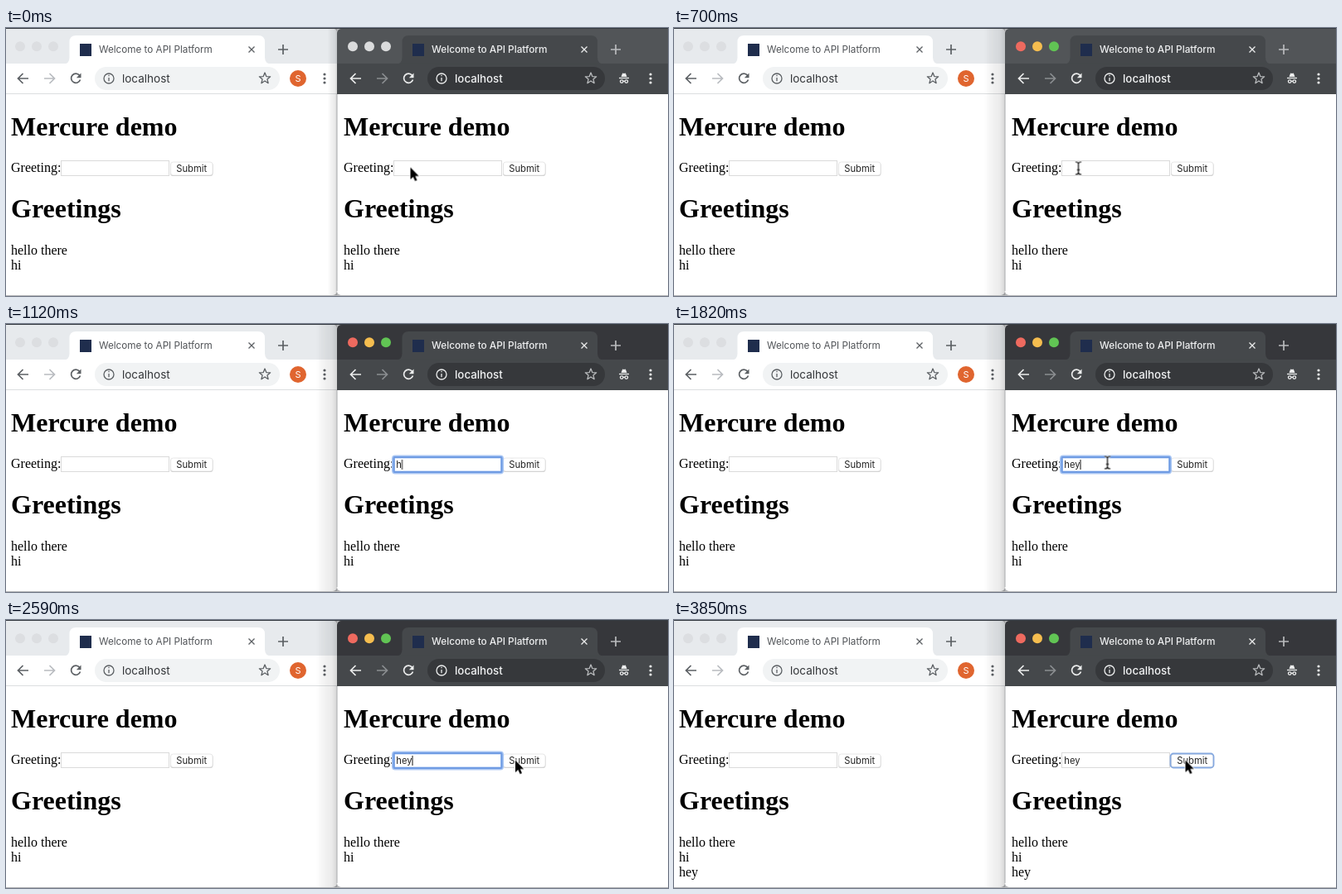
An HTML page that plays this animation: 798 by 324 pixels, repeating every 3.92 s.

```html
<!DOCTYPE html>
<html lang="en">
<head>
<meta charset="utf-8">
<title>Mercure demo</title>
<style>
html, body { margin: 0; width: 100%; height: 100%; overflow: hidden; background: #fff; }
svg { display: block; width: 798px; height: 324px; }
text { white-space: pre; }
.ui { font-family: Inter, Roboto, sans-serif; }
.page { font-family: "Liberation Serif", "Times New Roman", serif; font-size: 16px; fill: #000; }
.page .h { font-size: 32px; font-weight: 700; }
.small { font-size: 11.2px; fill: #222; }
.tab { font-size: 11.7px; fill: var(--title); }
.url { font-size: 13.5px; fill: var(--ink); }
.dark .tab { font-size: 11.8px; font-weight: 500; }
.dark .url { font-size: 13.3px; font-weight: 500; }
.line { fill: none; stroke: var(--icon); stroke-width: 1.7; }
.thin { stroke-width: 1.3; }
.dim { stroke: var(--dim); }
.soft { stroke: var(--soft); }
.dot { fill: var(--icon); }
.light { --strip: #e7eaed; --bar: #fff; --box: #f1f3f4; --ink: #333639; --title: #505357; --icon: #5c6064; --soft: #5c6064; --dim: #b9bcc0; --lamp: #dcdee1; }
.dark { --strip: #36373b; --bar: #45484b; --box: #36383b; --ink: #f1f2f3; --title: #eeeff0; --icon: #eceded; --soft: #b9bbbd; --dim: #8b8e91; --lamp: #dadbdc; }

.anim, .anim * { animation-duration: 3920ms; animation-iteration-count: infinite; animation-timing-function: step-end; }
.strip { animation-name: strip; }
.on { animation-name: on; }
.off { animation-name: off; }
.ring { animation-name: ring; }
.c1 { animation-name: c1; }
.c2 { animation-name: c2; }
.c3 { animation-name: c3; }
.caret { animation-name: caret, caretX; }
.beam { animation-name: beam, beamX; }
.arrow { animation-name: arrow, arrowX; }
.sent { animation-name: sent; }
.press { animation-name: press; }

@keyframes strip { 0% { fill: #525558; } 19.64%, 100% { fill: #36373b; } }
@keyframes on { 0% { opacity: 0; } 12.49%, 100% { opacity: 1; } }
@keyframes off { 0% { opacity: 1; } 12.49%, 100% { opacity: 0; } }
@keyframes ring { 0% { opacity: 0; } 26.78% { opacity: 1; } 69.64%, 100% { opacity: 0; } }
@keyframes c1 { 0% { fill-opacity: 0; } 28.57%, 100% { fill-opacity: 1; } }
@keyframes c2 { 0% { fill-opacity: 0; } 32.14%, 100% { fill-opacity: 1; } }
@keyframes c3 { 0% { fill-opacity: 0; } 33.92%, 100% { fill-opacity: 1; } }
@keyframes caret { 0% { opacity: 0; } 26.78% { opacity: 1; } 48.21% { opacity: 0; } 60.71% { opacity: 1; } 69.64%, 100% { opacity: 0; } }
@keyframes caretX {
  0% { transform: translateX(470.5px); }
  28.57% { transform: translateX(477.5px); }
  32.14% { transform: translateX(484px); }
  33.92%, 100% { transform: translateX(490px); }
}
@keyframes beam { 0% { opacity: 0; } 14.28% { opacity: 1; } 28.57% { opacity: 0; } 41.07% { opacity: 1; } 58.92%, 100% { opacity: 0; } }
@keyframes beamX {
  0% { transform: translate(487.5px, 169.5px); }
  39.28% { transform: translate(487.5px, 169.5px); animation-timing-function: steps(4); }
  46.42% { transform: translate(522.5px, 167.5px); animation-timing-function: steps(6); }
  57.14%, 100% { transform: translate(600px, 171px); }
}
@keyframes arrow { 0% { opacity: 1; } 14.28% { opacity: 0; } 58.92%, 100% { opacity: 1; } }
@keyframes arrowX {
  0% { transform: translate(487.5px, 168.5px); }
  58.92% { transform: translate(604px, 170px); animation-timing-function: steps(5); }
  67.85%, 100% { transform: translate(616.5px, 169.5px); }
}
@keyframes sent { 0% { opacity: 0; } 82.14%, 100% { opacity: 1; } }
@keyframes press { 0% { opacity: 0; } 94.64%, 100% { opacity: 1; } }
</style>
</head>
<body>
<svg id="stage" viewBox="0 0 798 324" class="anim">
  <defs>
    <linearGradient id="shade">
      <stop offset="0" stop-opacity="0"/>
      <stop offset=".3" stop-opacity=".04"/>
      <stop offset=".75" stop-opacity=".08"/>
      <stop offset="1" stop-opacity=".16"/>
    </linearGradient>
    <clipPath id="leftClip"><path d="M0 1H394a5 5 0 0 1 5 5V318a5 5 0 0 1-5 5H0Z"/></clipPath>
    <clipPath id="rightClip"><path d="M404 1H798V323H404a5 5 0 0 1-5-5V6a5 5 0 0 1 5-5Z"/></clipPath>
  </defs>
</svg>
<script>
const LAMPS = ['#ee6a5f', '#f5bd4f', '#61c454'];

const lamps = (cls, colour) =>
  `<g class="${cls}">` + [17, 37, 57].map((x, i) =>
    `<circle cx="${x}" cy="22.3" r="6" fill="${colour(i)}"/>`).join('') + '</g>';

const dots = x => [56, 61, 66].map(y => `<circle class="dot" cx="${x}" cy="${y}" r="1.6"/>`).join('');

function star(cx, cy) {
  const pts = Array.from({ length: 10 }, (_, i) => {
    const a = i * Math.PI / 5 - Math.PI / 2, r = i % 2 ? 3 : 7;
    return `${(cx + r * Math.cos(a)).toFixed(1)},${(cy + r * Math.sin(a)).toFixed(1)}`;
  });
  return `<polygon class="line thin soft" stroke-linejoin="round" points="${pts.join(' ')}"/>`;
}

// Everything is placed relative to the window's own left edge
function chrome(dark) {
  const end = dark ? 321 : 330, starX = dark ? 304 : 312, menuX = dark ? 376 : 384;
  const grey = () => 'var(--lamp)';
  const lights = dark ? lamps('off', grey) + lamps('on', i => LAMPS[i]) : lamps('', grey);
  const badge = dark
    ? `<path class="dot" d="M340.5 59l1.4-3.800q.3-.800 1.200-.500l.900.300.900-.300q.900-.300 1.200.500l1.400 3.800Z"/>
       <path class="line thin" d="M338 60.500h12"/>
       <circle class="line thin" cx="341.200" cy="64.600" r="1.800"/><circle class="line thin" cx="346.800" cy="64.600" r="1.800"/>
       <path class="line thin" d="M343 64.300h2"/>`
    : `<circle cx="352" cy="61" r="10" fill="#e0652f"/>
       <text class="ui" x="352" y="65" font-size="11" fill="#fff" text-anchor="middle">S</text>`;
  return `
    <rect class="${dark ? 'strip' : ''}" x="-3" width="402" height="44" fill="var(--strip)"/>
    <rect x="-3" y="43" width="402" height="37" fill="var(--bar)"/>
    <path fill="var(--bar)" d="M69 43.500q7.500 0 7.500-8V17q0-8 8-8H304q8 0 8 8V35.500q0 8 8 8Z"/>
    ${lights}
    <rect x="89" y="19" width="14" height="15" fill="#1f2d4d"/>
    <text class="ui tab" x="112" y="30">Welcome to API Platform</text>
    <path class="line thin" d="M292.500 22.500l7 7m0-7l-7 7"/>
    <path class="line soft" d="M328 26h12m-6-6v12"/>
    <path class="line" d="M27 61H14.500m6-6l-6 6 6 6"/>
    <path class="line dim" d="M46 61H58.500m-6-6l6 6-6 6"/>
    <path class="line" d="M88.600 57.300A5.600 5.600 0 1 0 89.500 62.500"/>
    <path class="dot" d="M90.500 54.500v5.700h-5.700Z"/>
    <rect x="107" y="47" width="${end - 107}" height="28" rx="14" fill="var(--box)"/>
    <circle class="line thin" cx="124" cy="61" r="6"/>
    <path class="line thin" d="M124 60v4.200m0-7.400v1.500"/>
    <text class="ui url" x="140" y="66">localhost</text>
    ${star(starX, 61)}${badge}${dots(menuX)}
    ${dark ? '' : '<rect y="79" width="399" height="1" fill="#dcdee0"/>'}`;
}

const page = dark => `
  <g class="page">
    <text class="h" x="6" y="130">Mercure demo</text>
    <text x="6" y="174">Greeting:</text>
    <rect x="66.500" y="160.500" width="130" height="18" fill="#fff" stroke="#dadada"/>
    <rect x="198" y="162.500" width="51.500" height="16.500" rx="3.500" fill="#c9c9c9"/>
    <rect x="198.500" y="162" width="50.500" height="16" rx="3" fill="#fff" stroke="#e3e3e3" stroke-width=".8"/>
    ${dark ? '<rect class="press" x="197.500" y="161.500" width="52" height="17" rx="3.500" fill="none" stroke="#86a9e0" stroke-width="1.800"/>' : ''}
    <text class="ui small" x="205.300" y="174">Submit</text>
    <text class="h" x="6" y="229">Greetings</text>
    <text x="6" y="273.500">hello there</text>
    <text x="6" y="291.500">hi</text>
    <text class="sent" x="6" y="309.500">hey</text>
  </g>`;

const windowAt = (x, dark) => `
  <g clip-path="url(#${dark ? 'rightClip' : 'leftClip'})">
    <rect x="${dark ? 399 : 0}" width="399" height="324" fill="#fff"/>
    <g class="${dark ? 'dark' : 'light'}" transform="translate(${x})">${chrome(dark)}${page(dark)}</g>
  </g>`;

const shadow = (cls, width) =>
  `<rect class="${cls}" x="${399 - width}" y="1" width="${width}" height="322" fill="url(#shade)"/>`;

const typed = `
  <g class="ring">
    <rect x="467" y="160.500" width="131" height="19" rx="2" fill="none" stroke="#a9c6f3" stroke-width="4"/>
    <rect x="467.500" y="161" width="130" height="18" rx="1" fill="none" stroke="#6f9be3" stroke-width="2"/>
  </g>
  <text class="ui small" x="470.300" y="174"><tspan class="c1">h</tspan><tspan class="c2">e</tspan><tspan class="c3">y</tspan></text>
  <path class="caret" d="M0 164v12" stroke="#111"/>`;

const stem = (colour, width) =>
  `<path d="M-3.500-7.500q3.500 0 3.500 2V5.500q0 2-3.500 2M3.500-7.500q-3.500 0-3.500 2V5.500q0 2 3.500 2M-1.800 2h3.600" stroke="${colour}" stroke-width="${width}"/>`;

const pointers = `
  <g class="beam" fill="none">${stem('#fff', 2.6)}${stem('#000', 1.2)}</g>
  <path class="arrow" d="M0 0V14.500L3.300 11.400 5.600 16.600 8 15.600 5.800 10.500H10.200Z" fill="#000" stroke="#fff" paint-order="stroke" stroke-width="1.600"/>`;

document.getElementById('stage').innerHTML += `
  <rect width="798" height="324" fill="#b4b5b7"/>
  <rect width="798" height="1" fill="#343940"/>
  ${windowAt(0, false)}
  ${shadow('off', 11)}${shadow('on', 25)}
  ${windowAt(401, true)}
  <path d="M399 80V318" stroke="#a9abad"/>
  ${typed}${pointers}`;
</script>
</body>
</html>
```
